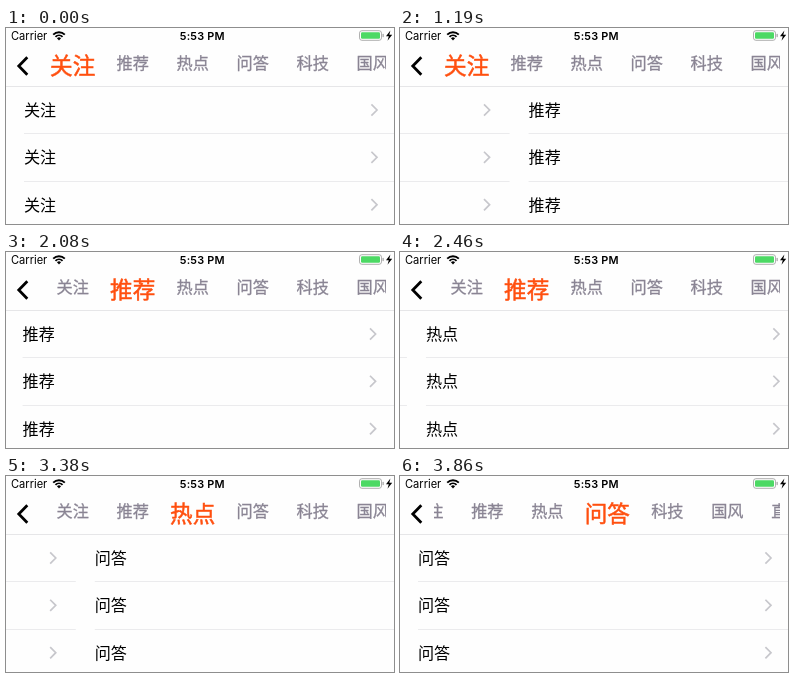
An HTML page with a canvas for the animation above (4.71 s loop, 388 by 196 pixels).

```html
<!DOCTYPE html>
<html lang="zh-CN">
<head>
<meta charset="utf-8">
<style>
html, body { margin: 0; width: 100%; height: 100%; overflow: hidden; background: #fefefe; }
canvas { display: block; width: 388px; height: 196px; }
</style>
</head>
<body>
<canvas></canvas>
<script>
const W = 388, H = 196, LOOP = 4710;
const PAGE = 392, TAB_STEP = 60;
const TABS = ['关注', '推荐', '热点', '问答', '科技', '国风', '直播'];
const CJK = '"Noto Sans CJK SC", "Noto Sans CJK", sans-serif';
const LATIN = 'Inter, sans-serif';

// lead and scale shape each flick; the tab changes when it settles
const SWIPES = [
  { start: 990, end: 1480, lead: 10, scale: 184.3 },
  { start: 2080, end: 2580, lead: 6, scale: 177 },
  { start: 3120, end: 3630, lead: 8, scale: 197.5 }
];
const SCROLL = { start: 3630, length: 250, distance: 40 };

const canvas = document.querySelector('canvas');
const ctx = canvas.getContext('2d');
const ratio = window.devicePixelRatio || 1;
canvas.width = W * ratio;
canvas.height = H * ratio;
ctx.scale(ratio, ratio);

function swipeProgress(s, t) {
  if (t < s.start) return 0;
  if (t >= s.end) return 1;
  return 1 - Math.exp(-Math.pow((t - s.start + s.lead) / s.scale, 1.74));
}

function text(str, x, y, font, color, align = 'left', bolder = 0) {
  ctx.font = font;
  ctx.textAlign = align;
  ctx.fillStyle = color;
  ctx.fillText(str, x, y);
  if (bolder) {
    ctx.strokeStyle = color;
    ctx.lineWidth = bolder;
    ctx.strokeText(str, x, y);
  }
}

function polyline(points, width, color) {
  ctx.beginPath();
  points.forEach(([x, y]) => ctx.lineTo(x, y));
  ctx.lineWidth = width;
  ctx.strokeStyle = color;
  ctx.stroke();
}

function rounded(x, y, w, h, r) {
  ctx.beginPath();
  ctx.roundRect(x, y, w, h, r);
}

function drawWifi(x, y) {
  const from = -Math.PI * 0.75, to = -Math.PI * 0.25;
  ctx.strokeStyle = ctx.fillStyle = '#000';
  ctx.lineWidth = 1.9;
  for (const r of [5, 8.2]) {
    ctx.beginPath();
    ctx.arc(x, y, r, from, to);
    ctx.stroke();
  }
  ctx.beginPath();
  ctx.moveTo(x, y);
  ctx.arc(x, y, 2.9, from, to);
  ctx.fill();
}

function drawBattery() {
  ctx.strokeStyle = '#a6a6a6';
  ctx.lineWidth = 0.9;
  rounded(353.5, 2.7, 22, 9.6, 2.4);
  ctx.stroke();
  ctx.fillStyle = '#4cd964';
  rounded(355, 4.2, 19, 6.6, 1.2);
  ctx.fill();
  ctx.fillStyle = '#a6a6a6';
  rounded(376.5, 5.8, 1.3, 3.4, 0.6);
  ctx.fill();
  ctx.fillStyle = '#000';
  ctx.beginPath();
  [[384.4, 2.4], [380, 8.3], [382.8, 8.3], [381.5, 12.8], [386.2, 6.7], [383.3, 6.7]]
    .forEach(([x, y]) => ctx.lineTo(x, y));
  ctx.fill();
}

function drawStatusBar() {
  text('Carrier', 5, 12, `11.1px ${LATIN}`, '#000');
  ctx.letterSpacing = '0.2px';
  text('5:53 PM', 196.3, 12, `600 10.9px ${LATIN}`, '#000', 'center');
  ctx.letterSpacing = '0px';
  drawWifi(53, 12.4);
  drawBattery();
}

function drawTabs(selected, scroll) {
  ctx.save();
  ctx.beginPath();
  ctx.rect(34, 20, 346, 36);
  ctx.clip();
  TABS.forEach((name, i) => {
    const x = 66.7 + i * TAB_STEP - scroll;
    if (i === selected) text(name, x, 46, `500 22.6px ${CJK}`, '#ff4f0f', 'center', 0.5);
    else text(name, x, 41, `500 16.2px ${CJK}`, '#8a8594', 'center', 0.3);
  });
  ctx.restore();
}

function drawPage(name, x) {
  for (let row = 0; row < 3; row++) {
    const mid = 82 + row * 47.35;
    text(name, x + 19, Math.round(mid + 6), `16.1px ${CJK}`, '#000');
    polyline([[x + 366.4, mid - 5.6], [x + 372, mid], [x + 366.4, mid + 5.6]], 1.7, '#c7c7cc');
    ctx.fillStyle = '#ebebed';
    ctx.fillRect(x + 19, Math.round(105 + row * 47.6), PAGE - 19, 1);
  }
}

function draw(t) {
  ctx.fillStyle = '#fefefe';
  ctx.fillRect(0, 0, W, H);

  const position = SWIPES.reduce((sum, s) => sum + swipeProgress(s, t), 0);
  const selected = SWIPES.filter(s => t >= s.end).length;
  const k = Math.min(1, Math.max(0, (t - SCROLL.start) / SCROLL.length));
  const scroll = SCROLL.distance * k * k * (3 - 2 * k);

  for (let i = 0; i < 4; i++) {
    const x = (i - position) * PAGE - 1;
    if (x < W && x + PAGE > 0) drawPage(TABS[i], x);
  }
  ctx.fillStyle = '#e6e6e8';
  ctx.fillRect(0, 58, W, 1);

  drawStatusBar();
  polyline([[21.3, 29.2], [12.8, 38], [21.3, 46.8]], 2.8, '#000');
  drawTabs(selected, scroll);
}

const origin = performance.now();
function tick() {
  draw((performance.now() - origin) % LOOP);
  requestAnimationFrame(tick);
}
tick();
</script>
</body>
</html>
```
